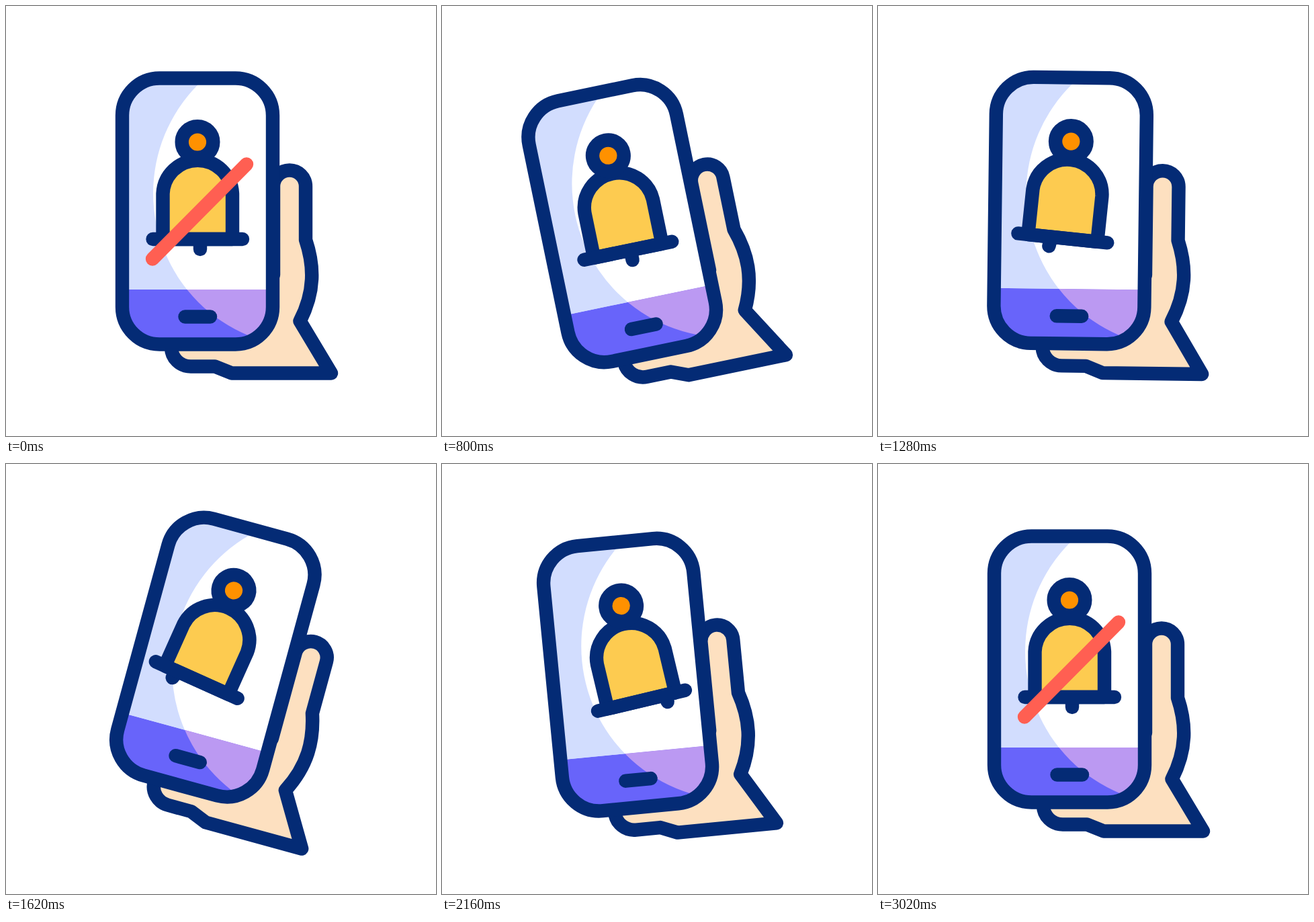
These frames come from a looping animation (640 by 640 pixels, 3.22 s). An HTML page:

```html
<!DOCTYPE html>
<html lang="en">
<head>
<meta charset="utf-8">
<title>Muted phone</title>
<style>
  html, body { margin: 0; width: 100%; height: 100%; overflow: hidden; background: #fff; }
  svg { display: block; width: 100%; height: 100%; }
  .line { fill: none; stroke: #042b75; stroke-width: 20.4; stroke-linecap: round; stroke-linejoin: round; }
</style>
</head>
<body>
<svg viewBox="0 0 640 640">
  <defs>
    <clipPath id="screen"><rect x="173" y="107.5" width="224" height="396" rx="55.5"/></clipPath>
  </defs>
  <g id="phone">
    <path class="line" style="fill:#fde0c0" d="M398 400V268.5A24 24 0 0 1 446 268.5V348C459 387 460 425 437.5 469L484 546.5H336L311 536.5H275C259 536.5 246 524 246 508Z"/>
    <g clip-path="url(#screen)">
      <rect x="163" y="97" width="244" height="417" fill="#d2ddfe"/>
      <circle cx="448" cy="278.7" r="229" fill="#fff"/>
      <g clip-path="url(#bar)">
        <rect x="163" y="422" width="244" height="92" fill="#6864fa"/>
        <circle cx="448" cy="278.7" r="229" fill="#bb99f2"/>
      </g>
      <clipPath id="bar"><rect x="163" y="422" width="244" height="92"/></clipPath>
    </g>
    <rect class="line" x="173" y="107.5" width="224" height="396" rx="55.5"/>
    <path class="line" d="M266.5 462.5H304"/>
    <path class="line" id="clapper" d="M289 355V362"/>
    <g id="bell">
      <path class="line" style="fill:#fdcb50" d="M233.5 347V279.3A51.8 51.8 0 0 1 337 279.3V347Z"/>
      <path class="line" d="M218.5 347H352"/>
    </g>
    <circle class="line" style="fill:#ff9100" cx="285" cy="202.5" r="23.3"/>
    <path id="slash" class="line" style="stroke:#ff5f52" d="M358 235.5L218 376.5"/>
  </g>
</svg>
<script>
  const LOOP = 3220, STEP = 20;
  // each track: [time in ms, value]
  const tilt = [[200, 0], [720, -11.6], [1020, -12.2], [1570, 16], [2020, -7.2], [2540, 2.65], [2940, 0]];
  const swing = [[1000, 0], [1540, 10], [2060, -10], [2530, 10], [2980, 0]];
  const slashEnd = [[200, 1], [680, 0], [2340, 0], [2820, 1]];

  const byId = id => document.getElementById(id);
  const [phone, bell, clapper, slash] = ['phone', 'bell', 'clapper', 'slash'].map(byId);

  function valueAt(track, t) {
    if (t <= track[0][0]) return track[0][1];
    for (let i = 1; i < track.length; i++) {
      const [t0, a] = track[i - 1], [t1, b] = track[i];
      if (t < t1) return a + (b - a) * (1 - Math.cos(Math.PI * (t - t0) / (t1 - t0))) / 2;
    }
    return track[track.length - 1][1];
  }

  function turn(el, angle, x, y) {
    el.setAttribute('transform', `rotate(${angle} ${x} ${y})`);
  }

  function draw(t) {
    const sway = valueAt(swing, t);
    const part = valueAt(slashEnd, t);
    turn(phone, valueAt(tilt, t), 365, 396.4);
    turn(bell, sway, 285, 227.5);
    turn(clapper, sway * 2.6, 285, 215);
    slash.setAttribute('d', `M358 235.5L${358 - 140 * part} ${235.5 + 141 * part}`);
    slash.style.display = part > 0.002 ? '' : 'none';
  }

  const start = performance.now();
  function tick() {
    const t = (performance.now() - start) % LOOP;
    draw(Math.floor(t / STEP) * STEP);
    requestAnimationFrame(tick);
  }
  draw(0);
  requestAnimationFrame(tick);
</script>
</body>
</html>
```
